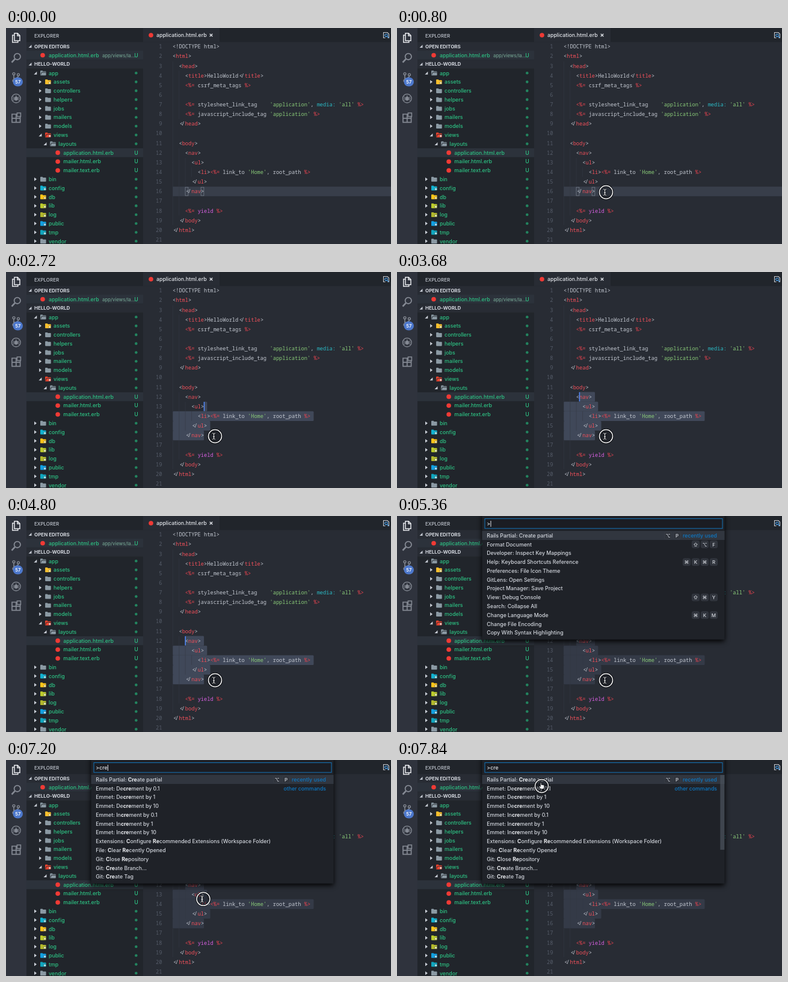
An HTML page that plays this animation: 640 by 361 pixels, repeating every 8000 ms.

```html
<!DOCTYPE html>
<html lang="en">
<head>
<meta charset="utf-8">
<title>Editor: create partial</title>
<style>
html, body { margin: 0; width: 100%; height: 100%; overflow: hidden; background: #282c34; }
svg { display: block; width: 640px; height: 361px; }
text { white-space: pre; }
.ui { font: 500 8.75px Inter, "DejaVu Sans", sans-serif; }
.code { font: 500 8.66px "Noto Sans Mono", "DejaVu Sans Mono", monospace; }
</style>
</head>
<body>
<svg id="stage" viewBox="0 0 640 361" xmlns="http://www.w3.org/2000/svg"></svg>
<script>
const NS = 'http://www.w3.org/2000/svg';
const LOOP = 8000;
const C = {
  side: '#21252b', bar: '#2f333d', editor: '#282c34', row: '#2c323b', fg: '#c3c8d1',
  green: '#2dc384', tag: '#f0505a', erb: '#ea4450', str: '#89ca78', cyan: '#2bbac5',
  purple: '#d55fde', gem: '#f03a35', grey: '#8b9aa4', caret: '#528bff'
};
const stage = document.getElementById('stage');

function el(parent, name, attrs = {}, content) {
  const node = document.createElementNS(NS, name);
  for (const k in attrs) node.setAttribute(k, attrs[k]);
  if (content !== undefined) node.textContent = content;
  return parent.appendChild(node);
}
const group = (parent, attrs) => el(parent, 'g', attrs);
const rect = (p, x, y, width, height, fill, more) => el(p, 'rect', { x, y, width, height, fill, ...more });
const circle = (p, cx, cy, r, fill, more) => el(p, 'circle', { cx, cy, r, fill, ...more });
const path = (p, d, more) => el(p, 'path', { d, fill: 'none', ...more });
const label = (p, x, y, s, fill, more) => el(p, 'text', { x, y: y + 3.2, fill, class: 'ui', ...more }, s);
const show = (node, on) => node.setAttribute('visibility', on ? 'visible' : 'hidden');

// ---------- editor ----------
const X0 = 277, CW = 5.21, LH = 16.13;
const colX = c => X0 + c * CW;
const lineY = n => 31.2 + (n - 1) * LH;
const lines = [
  '<!DOCTYPE html>',
  '<html>',
  '  <head>',
  '    <title>HelloWorld</title>',
  '    <%= csrf_meta_tags %>',
  '',
  "    <%= stylesheet_link_tag    'application', media: 'all' %>",
  "    <%= javascript_include_tag 'application' %>",
  '  </head>',
  '',
  '  <body>',
  '    <nav>',
  '      <ul>',
  "        <li><%= link_to 'Home', root_path %>",
  '      </ul>',
  '    </nav>',
  '',
  '    <%= yield %>',
  '  </body>',
  '</html>',
  ''
];

rect(stage, 0, 0, 640, 361, C.editor);
const lineMark = rect(stage, X0, lineY(16) - 8, 363, 16, '#383e4a');
const selection = group(stage);

const guides = group(stage, { stroke: '#353a44', 'stroke-width': 0.6 });
[[0, 3, 19], [2, 4, 8], [2, 12, 18], [4, 13, 15], [6, 14, 14]].forEach(([c, a, b]) =>
  path(guides, `M${colX(c) + .3} ${lineY(a) - 8}V${lineY(b) + 8}`));

function drawLine(src, n) {
  const y = lineY(n) + 3.1;
  el(stage, 'text', { x: 259.5, y, fill: '#555c69', 'text-anchor': 'end', class: 'code' }, n);
  const put = (c, s, fill) => el(stage, 'text', { x: colX(c), y, fill, class: 'code' }, s);
  if (n === 1) return put(0, src, C.fg);
  let prev = '';
  for (const m of src.matchAll(/<%=|%>|<\/|[<>]|'[^']*'|\w+:|\w+|,/g)) {
    const s = m[0], c = m.index;
    if (s === '</') {
      put(c + .25, '<', C.fg);
      put(c + .85, '/', C.fg);
    } else {
      const fill = /%/.test(s) ? C.erb : s[0] === "'" ? C.str : s === 'yield' ? C.purple :
        /:$/.test(s) ? C.cyan : prev[0] === '<' && !/%/.test(prev) ? C.tag : C.fg;
      put(c, s, fill);
    }
    prev = s;
  }
}
lines.forEach((s, i) => drawLine(s, i + 1));

const brackets = group(stage, { fill: 'none', stroke: '#7d8592', 'stroke-width': 0.7 });
[4, 9].forEach(c => rect(brackets, colX(c) + .2, lineY(16) - 7, CW - .4, 14, 'none'));
const caret = rect(stage, 0, 0, 1.5, 15.5, C.caret);

// ---------- tabs ----------
rect(stage, 228, 0, 412, 23.5, C.side);
rect(stage, 228, 0, 127, 23.5, C.editor);
circle(stage, 241, 12, 3.8, C.gem);
label(stage, 250, 12, 'application.html.erb', '#e4e7ec');
path(stage, 'M338.7 9.7l4.6 4.6m0-4.6l-4.6 4.6', { stroke: '#e4e7ec', 'stroke-width': 1.3 });
path(stage, 'M632 7.5h-4.5v9h3m1.5-9h2l2.5 2.5v6.5h-2', { stroke: '#c5cad2', 'stroke-width': 1.1 });
circle(stage, 632, 12.2, 2.2, 'none', { stroke: '#4a9be0', 'stroke-width': 1.2 });
path(stage, 'M633.6 13.8l2.6 2.7', { stroke: '#4a9be0', 'stroke-width': 1.2 });

// ---------- side bar ----------
rect(stage, 34, 0, 194, 361, C.side);
const header = (y, s) => {
  rect(stage, 34, y - 7, 194, 14.6, C.editor);
  path(stage, `M42.5 ${y - 2.5}v5h-5z`, { fill: '#c3c8d1' });
  label(stage, 47, y, s, '#d2d6dd', { style: 'font-size:8px;font-weight:700' });
};
label(stage, 47, 12.3, 'EXPLORER', '#c3c8d1', { style: 'font-size:8px' });
header(30.5, 'OPEN EDITORS');
rect(stage, 34, 38, 194, 14.8, C.row);
circle(stage, 61, 45.5, 3.8, C.gem);
label(stage, 71, 45.5, 'application.html.erb', C.green);
label(stage, 160, 45.5, 'app/views/la…', '#6f9c8c', { style: 'font-size:7.8px' });
label(stage, 216.5, 45.5, 'U', C.green, { 'text-anchor': 'middle' });
header(60.2, 'HELLO-WORLD');

function folder(x, y, fill, open, mark) {
  path(stage, `M${x - 4.8} ${y - 3.2}q0-.8.8-.8h2.8l1 1.1h4.2q.8 0 .8.8v5.3q0 .8-.8.8h-8q-.8 0-.8-.8z`, { fill });
  if (open) path(stage, `M${x - 4} ${y + 3}l1.3-4.2h7.6`, { stroke: C.side, 'stroke-width': .9 });
  if (mark) circle(stage, x + 2.8, y + 1.7, 2, mark, { stroke: C.side, 'stroke-width': .4 });
}

// name, depth, folder colour (none for a file), open, mark
const tree = [
  ['app', 0, C.grey, 1], ['assets', 1, '#fbc02d', 0, '#fff0a8'], ['controllers', 1, C.grey],
  ['helpers', 1, C.grey], ['jobs', 1, C.grey], ['mailers', 1, C.grey], ['models', 1, C.grey],
  ['views', 1, '#f4452f', 1, '#ffc4bb'], ['layouts', 2, C.grey, 1],
  ['application.html.erb', 3], ['mailer.html.erb', 3], ['mailer.text.erb', 3],
  ['bin', 0, C.grey], ['config', 0, '#12b1cf', 0, '#b2ebf2'], ['db', 0, '#fcc419', 0, '#fff0a8'],
  ['lib', 0, '#bccb2c', 0, '#eff4b8'], ['log', 0, '#b0b62c', 0, '#eff4b8'],
  ['public', 0, '#129fe0', 0, '#b3e5fc'], ['tmp', 0, '#10a5bd', 0, '#b2ebf2'], ['vendor', 0, C.grey]
];
tree.forEach(([name, depth, fill, open, mark], i) => {
  const y = 75.3 + i * 14.79, x = 61.8 + depth * 8.1;
  if (i === 9) rect(stage, 34, y - 7.4, 194, 14.8, C.row);
  if (fill) {
    const a = x - 13;
    path(stage, open ? `M${a + 2.5} ${y - 2.5}v5h-5z` : `M${a - 1.8} ${y - 3}l4 3l-4 3z`, { fill: '#c9ced6' });
    folder(x, y, fill, open, mark);
    circle(stage, 216.3, y, 2.3, '#23845f');
  } else {
    circle(stage, x, y, 3.8, C.gem);
    label(stage, 216.5, y, 'U', C.green, { 'text-anchor': 'middle' });
  }
  label(stage, x + 9.2, y, name, C.green);
});

// ---------- activity bar ----------
rect(stage, 0, 0, 34, 361, C.bar);
const icons = group(stage, { stroke: '#858a94', 'stroke-width': 1.8, fill: 'none' });
path(icons, 'M14 8.8h5.2l3.8 3.8v8.6h-9zM19 9v4h4M13.5 12h-2.7v12h9v-2.6', { stroke: '#e6e8ec', 'stroke-width': 1.5 });
circle(icons, 18.8, 47.8, 5.2, 'none');
path(icons, 'M15 51.7l-5.5 5.8', { 'stroke-width': 2.6 });
[[13, 76.5], [20.5, 78], [13, 88]].forEach(([x, y]) => circle(icons, x, y, 1.9, 'none', { 'stroke-width': 1.4 }));
path(icons, 'M13 78.5v7.5M20.5 80q0 3.5-7.5 4.5', { 'stroke-width': 1.5 });
rect(stage, 11.5, 82.5, 16.5, 15, '#4d78cc', { rx: 7.5 });
label(stage, 19.8, 90, '57', '#fff', { 'text-anchor': 'middle', style: 'font-size:7.6px;font-weight:600' });
circle(icons, 16.8, 117.7, 7.3, 'none', { 'stroke-width': 1.3 });
el(icons, 'ellipse', { cx: 16.8, cy: 118, rx: 2.6, ry: 3.6, fill: '#858a94', stroke: 'none' });
path(icons, 'M11.5 115l10.6 6M11.5 121l10.6-6M11 118h11.6M16.8 112.5v3', { 'stroke-width': 1 });
path(icons, 'M10 144h13.6v13.6H10zM16.8 144v13.6M10 150.8h13.6', { 'stroke-width': 1.7 });
rect(icons, 18.4, 142, 6, 6, C.bar, { 'stroke-width': 1.5 });

// ---------- command palette ----------
const palette = group(stage);
rect(palette, 141.5, -6, 403, 212.5, '#1f2228', { style: 'filter:drop-shadow(0 3px 4px #000)' });
rect(palette, 146, 4.5, 395, 16.3, '#1b1d23', { stroke: '#1474b8', 'stroke-width': 1 });
const query = label(palette, 149.3, 12.8, '>', '#e2e5ea');
const queryCaret = rect(palette, 0, 8, 1, 10, '#e2e5ea');
rect(palette, 141.5, 25, 403, 15, '#31363f');
const list = group(palette);
const scroller = rect(palette, 537.3, 25, 7, 125, '#4a505b', { opacity: .75 });

const recent = [
  'Rails Partial: Create partial', 'Format Document', 'Developer: Inspect Key Mappings',
  'Help: Keyboard Shortcuts Reference', 'Preferences: File Icon Theme', 'GitLens: Open Settings',
  'Project Manager: Save Project', 'View: Debug Console', 'Search: Collapse All',
  'Change Language Mode', 'Change File Encoding', 'Copy With Syntax Highlighting'
];
const steps = ['0.1', '1', '10'];
const matches = [
  recent[0], ...steps.map(n => 'Emmet: Decrement by ' + n), ...steps.map(n => 'Emmet: Increment by ' + n),
  'Extensions: Configure Recommended Extensions (Workspace Folder)', 'File: Clear Recently Opened',
  'Git: Close Repository', 'Git: Create Branch...', 'Git: Create Tag'
];
const keys = {
  [recent[0]]: '⌥P', [recent[1]]: '⇧⌥F', [recent[3]]: '⌘K⌘R', [recent[7]]: '⇧⌘Y', [recent[9]]: '⌘KM'
};

function rowText(parent, y, s, q) {
  const t = label(parent, 149.3, y, '', '#d3d7de');
  const m = q && s.match(new RegExp(`(${q})|(\\b${q[0]})(.*?\\b)(${q.slice(1)})`, 'i'));
  const span = (str, bold) => str && el(t, 'tspan', bold ? { 'font-weight': 700, fill: '#eceef2' } : {}, str);
  if (!m) return span(s);
  span(s.slice(0, m.index));
  if (m[1]) span(m[1], true);
  else { span(m[2], true); span(m[3]); span(m[4], true); }
  span(s.slice(m.index + m[0].length));
}

let drawn = null;
function drawList(q) {
  if (q === drawn) return;
  drawn = q;
  list.replaceChildren();
  query.textContent = '>' + q;
  const rows = q === '' ? recent :
    q === 'c' ? [...recent.filter(s => /c/i.test(s)), 'Clear Command History'] : matches;
  rows.forEach((s, i) => {
    const y = 32.6 + i * 14.78;
    rowText(list, y, s, q);
    const caps = [...(keys[s] || '')];
    caps.forEach((k, j) => {
      const x = (i ? 526.5 : 465.5) - (caps.length - 1 - j) * 15;
      rect(list, x - 6, y - 5.8, 12, 11.6, '#30343c', { rx: 2, stroke: '#3d424c', 'stroke-width': .6 });
      label(list, x, y, k, '#d3d7de', { 'text-anchor': 'middle', style: 'font-size:8px' });
    });
  });
  const note = (i, s) => label(list, 532, 32.6 + i * 14.78, s, '#0d78c4', { 'text-anchor': 'end' });
  note(0, 'recently used');
  if (q) note(q === 'c' ? 11 : 1, 'other commands');
}

// ---------- pointer ----------
const pointer = group(stage);
circle(pointer, 0, 0, 11, 'rgba(20,23,28,.35)', { stroke: '#0c0d10', 'stroke-width': 3.4 });
circle(pointer, 0, 0, 11, 'none', { stroke: '#f2f3f5', 'stroke-width': 1.5 });
const beam = group(pointer);
const beamPath = 'M-4.3-5q2.3 0 2.3 1.6v6.8q0 1.6-2.3 1.6M.3-5q-2.3 0-2.3 1.6v6.8q0 1.6 2.3 1.6M-3.5.8h3';
path(beam, beamPath, { stroke: '#0c0d10', 'stroke-width': 2.4 });
path(beam, beamPath, { stroke: '#f2f3f5', 'stroke-width': 1 });
const hand = path(pointer,
  'M-2.3-5.6q1-.9 1.8 0v3.4q1-.6 1.7.2q1-.5 1.6.3q1.4-.4 1.6 1v2.8l-1.2 3h-5l-3-4.2q.2-1.4 1.6-.6l.9.8z',
  { fill: '#f2f3f5', stroke: '#0c0d10', 'stroke-width': .9 });

// ---------- timeline ----------
const moves = [
  [0, 16, 10], [2400, 15, 10], [2560, 14, 10], [2720, 13, 10], [2880, 12, 9],
  [3120, 12, 8], [3360, 12, 7], [3520, 12, 6], [3680, 12, 5], [3840, 12, 4]
];
const typed = [[0, ''], [5920, 'c'], [6080, 'cr'], [6160, 'cre']];
const at = (table, t) => table.filter(e => e[0] <= t).pop();
const within = (t, ...spans) => spans.some(([a, b]) => t >= a && t < b);
const clamp = v => Math.max(0, Math.min(1, v));
const mix = (a, b, p) => a + (b - a) * p;
const easeOut = p => 1 - (1 - p) ** 2;
const easeInOut = p => p * p * (3 - 2 * p);

function drawSelection(line, col, focused) {
  selection.replaceChildren();
  if (line === 16) return;
  for (let n = line; n <= 16; n++) {
    const from = n === line ? col : 0;
    const to = n === 16 ? 10 : lines[n - 1].length + 1;
    rect(selection, colX(from), lineY(n) - 8.1, (to - from) * CW, 16.2, focused ? '#404859' : '#343a47', { rx: 1.5 });
  }
}

function pointerPos(t) {
  if (t < 7040) {
    const p = easeOut(clamp(Math.floor((t - 400) / 80) / 5));
    return [mix(452, 347.5, p), mix(318, 274.5, p)];
  }
  const p = easeInOut(clamp((Math.floor((t - 7040) / 80) + 1) / 11));
  return [mix(347.5, 240.5, p), mix(274.5, 43.5, p)];
}

function draw(t) {
  const open = t >= 5360;
  const [, line, col] = at(moves, t);
  drawSelection(line, col, !open);
  show(lineMark, line === 16);
  show(brackets, line === 16);
  caret.setAttribute('x', colX(col) - .4);
  caret.setAttribute('y', lineY(line) - 7.8);
  show(caret, within(t, [1040, 1520], [2000, 4320], [4800, 5360]));

  const [x, y] = pointerPos(t);
  const over = open && y < 206;
  pointer.setAttribute('transform', `translate(${x} ${y})`);
  show(pointer, t >= 400);
  show(beam, t >= 400 && !over);
  show(hand, over);

  palette.setAttribute('display', open ? 'inline' : 'none');
  if (!open) return;
  drawList(at(typed, t)[1]);
  queryCaret.setAttribute('x', 149.6 + query.getComputedTextLength());
  show(queryCaret, within(t, [5360, 6640], [7120, 7600]));
  show(scroller, within(t, [5920, 6640]) || over);
}

const start = performance.now();
function tick() {
  draw((performance.now() - start) % LOOP);
  requestAnimationFrame(tick);
}
tick();
</script>
</body>
</html>
```
